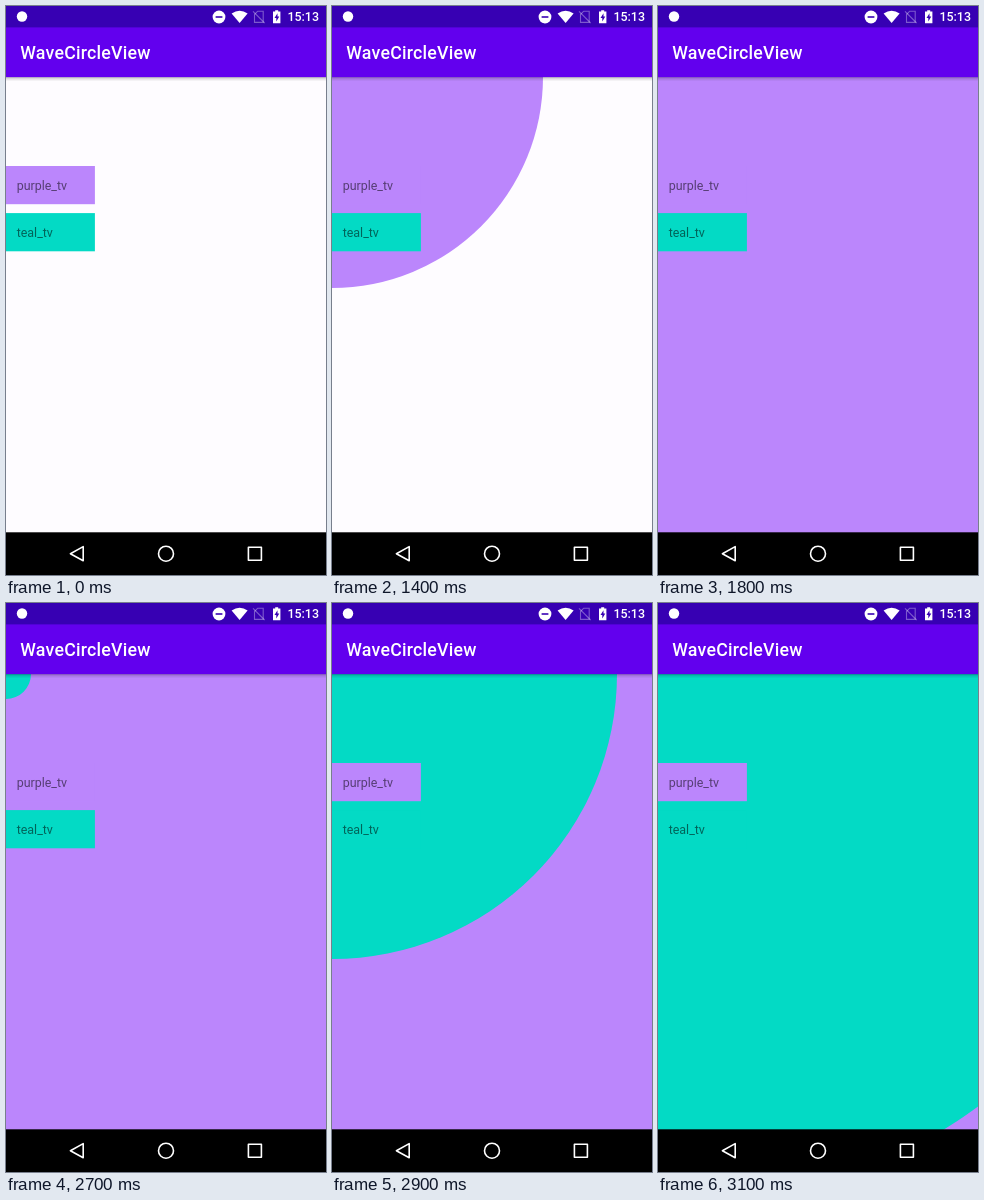
Animation of 320x569 px, one loop 3.2 s. Source, as an HTML page:

```html
<!DOCTYPE html>
<html lang="en">
<head>
<meta charset="utf-8">
<title>WaveCircleView</title>
<style>
  html, body { margin: 0; width: 100%; height: 100%; overflow: hidden; background: #000; }
  svg { display: block; width: 100%; height: 100%; }
  text { font-family: Roboto, sans-serif; font-size: 12.44px; }
  .bar { font-weight: 500; fill: #fff; }
  .title { font-size: 17.78px; letter-spacing: .0125em; }
  .label { fill: #000; fill-opacity: .54; }
  .purple { fill: #bb86fc; }
  .teal { fill: #03dac5; }
  .nav { fill: none; stroke: #fff; stroke-width: 1.6; stroke-linejoin: round; }

  /* The wave advances every 100 ms (3.125 %) along a cosine ease-in-out. */
  .wave { r: 0; animation: 3.2s step-end infinite; }
  .wave.purple { animation-name: first; }
  .wave.teal { animation-name: second; }
  @keyframes first {
    0% { r: 0px; }
    37.5% { r: 3.4px; }
    40.625% { r: 74px; }
    43.75% { r: 211px; }
    46.875% { r: 372px; }
    50% { r: 501px; }
    53.125% { r: 556px; }
    56.25%, 100% { r: 570px; }
  }
  @keyframes second {
    0% { r: 0px; }
    84.375% { r: 25px; }
    87.5% { r: 131px; }
    90.625% { r: 285px; }
    93.75% { r: 439px; }
    96.875%, 100% { r: 538px; }
  }
</style>
</head>
<body>
<svg viewBox="0 0 320 569" preserveAspectRatio="none">
  <defs>
    <linearGradient id="shade" x2="0" y2="1">
      <stop offset="0" stop-color="#000" stop-opacity=".3"/>
      <stop offset=".4" stop-color="#000" stop-opacity=".11"/>
      <stop offset="1" stop-color="#000" stop-opacity="0"/>
    </linearGradient>
  </defs>

  <rect width="320" height="569" fill="#fefcff"/>
  <circle class="wave purple" cy="71"/>
  <circle class="wave teal" cy="71"/>

  <rect class="purple" y="160" width="88.9" height="38.2"/>
  <rect class="teal" y="207.1" width="88.9" height="38.2"/>
  <text class="label" x="10.7" y="184.2">purple_tv</text>
  <text class="label" x="10.7" y="231.2">teal_tv</text>

  <!-- App bar -->
  <rect y="71" width="320" height="4.5" fill="url(#shade)"/>
  <rect y="21" width="320" height="50.1" fill="#6200ee"/>
  <text class="bar title" x="14.2" y="53.2">WaveCircleView</text>

  <!-- Status bar -->
  <rect width="320" height="21.4" fill="#3700b3"/>
  <g fill="#fff">
    <circle cx="16" cy="10.5" r="5.2"/>
    <circle cx="213" cy="11" r="6.4"/>
    <path d="M209.6 10.2h6.8v1.6h-6.8z" fill="#3700b3"/>
    <path d="M225.6 7.4Q233.6 1.9 241.6 7.4L233.6 17z"/>
    <path d="M267 5.6h2.2V4.3h3v1.3h2.2v11.6H267z"/>
    <path d="M271.5 7.3l-3 4.8h1.8v3.3l3-5h-1.8z" fill="#3700b3"/>
  </g>
  <g fill="none" stroke="#fff" stroke-opacity=".35" stroke-width="1.1">
    <path d="M248.5 8.5L251.7 5.2H257.2V16.4H248.5z"/>
    <path d="M247 5.4L258.6 17"/>
  </g>
  <text class="bar" x="313" y="15.4" text-anchor="end">15:13</text>

  <!-- Navigation bar -->
  <rect y="526.3" width="320" height="42.7"/>
  <g class="nav">
    <path d="M64.4 547.7L77.2 540.6V554.8z"/>
    <circle cx="160" cy="547.7" r="7.5"/>
    <rect x="242.4" y="541.2" width="13" height="13"/>
  </g>
</svg>
</body>
</html>
```
